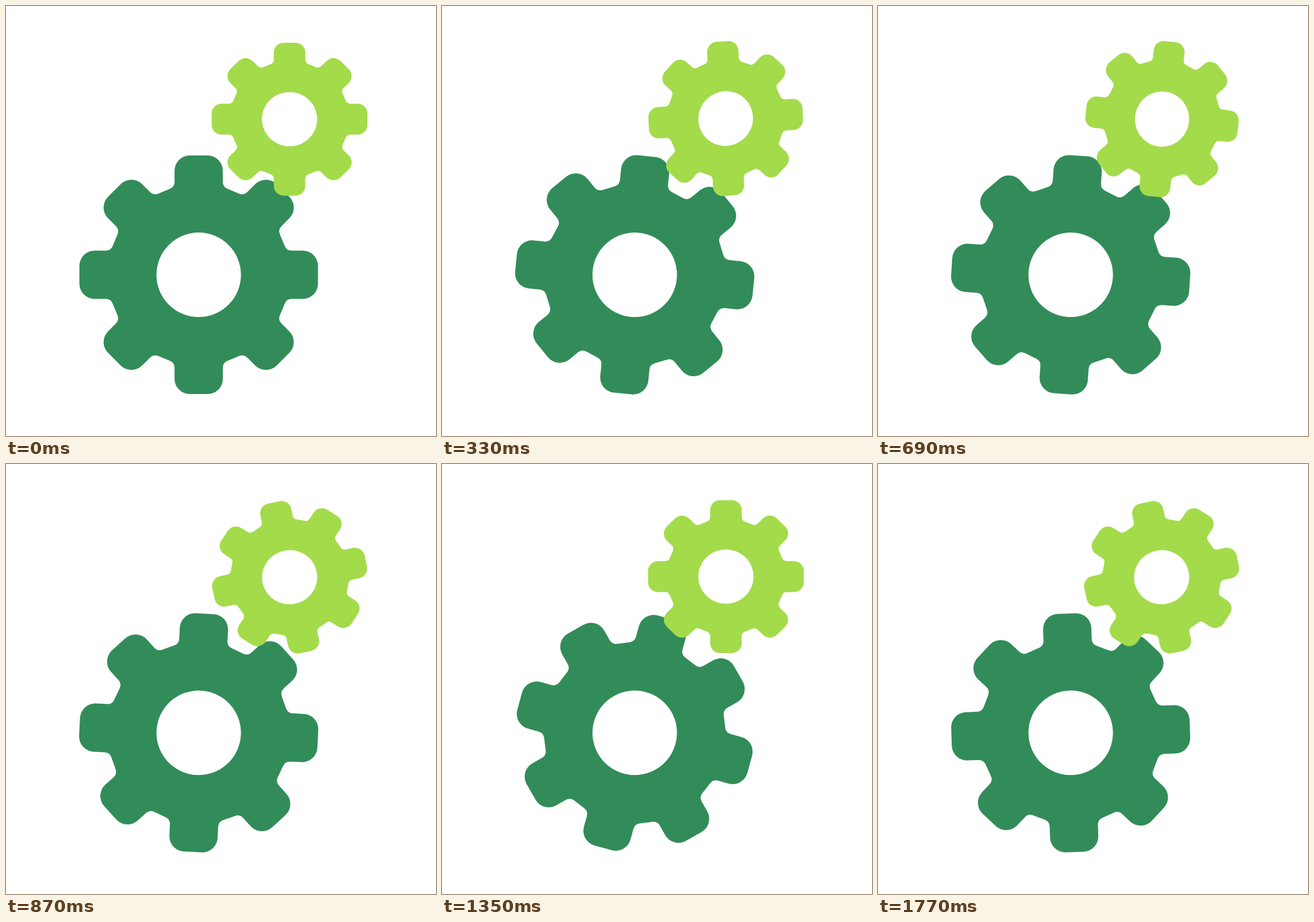
Animation, 748 px wide and 748 px high, one loop 1800 ms. Source, as an HTML page with a canvas:

```html
<!DOCTYPE html>
<html lang="en">
<head>
<meta charset="utf-8">
<title>Turning gears</title>
<style>
  html, body { margin: 0; width: 100%; height: 100%; overflow: hidden; background: #fff; }
  canvas { display: block; }
</style>
</head>
<body>
<canvas id="stage" width="748" height="748"></canvas>
<script>
const ctx = document.getElementById('stage').getContext('2d');
const STEP = 30, STEPS = 60, TEETH = 8;

// Gear outline around the origin: tip radius, root depth, half tooth width, corner radii.
const TIP = 207.5, ROOT = 153, HALF = 42, TIP_ROUND = 26.5, ROOT_ROUND = 13, HOLE = 73.5;

const gears = [
  { x: 335.2, y: 467.6, dx: 0, dy: 0, sx: 1, sy: 1, color: '#328c59', turn: -360 / 47 },
  { x: 493.6, y: 196.4, dx: -0.35, dy: 0.5, sx: 0.653, sy: 0.641, color: '#a3db4b', turn: 12 }
];

const rad = deg => deg * Math.PI / 180;

function gearPath() {
  const tooth = [
    [-HALF, -ROOT, ROOT_ROUND], [-HALF, -TIP, TIP_ROUND],
    [HALF, -TIP, TIP_ROUND], [HALF, -ROOT, ROOT_ROUND]
  ];
  const points = [];
  for (let k = 0; k < TEETH; k++) {
    const c = Math.cos(rad(k * 360 / TEETH)), s = Math.sin(rad(k * 360 / TEETH));
    for (const [x, y, r] of tooth) points.push([x * c - y * s, x * s + y * c, r]);
  }
  const path = new Path2D();
  const first = points[0], last = points[points.length - 1];
  path.moveTo((first[0] + last[0]) / 2, (first[1] + last[1]) / 2);
  points.forEach(([x, y, r], i) => {
    const next = points[(i + 1) % points.length];
    path.arcTo(x, y, next[0], next[1], r);
  });
  path.closePath();
  path.moveTo(HOLE, 0);
  path.arc(0, 0, HOLE, 0, 2 * Math.PI);
  path.closePath();
  return path;
}

const outline = gearPath();

function draw(step) {
  ctx.fillStyle = '#fff';
  ctx.fillRect(0, 0, 748, 748);
  for (const g of gears) {
    ctx.save();
    ctx.translate(g.x, g.y);
    ctx.rotate(rad(g.turn * step));
    ctx.translate(g.dx, g.dy);
    ctx.scale(g.sx, g.sy);
    ctx.fillStyle = g.color;
    ctx.fill(outline, 'evenodd');
    ctx.restore();
  }
}

const start = performance.now();
function tick() {
  const time = Math.max(0, performance.now() - start);
  draw(Math.floor(time / STEP) % STEPS);
  requestAnimationFrame(tick);
}
tick();
</script>
</body>
</html>
```
